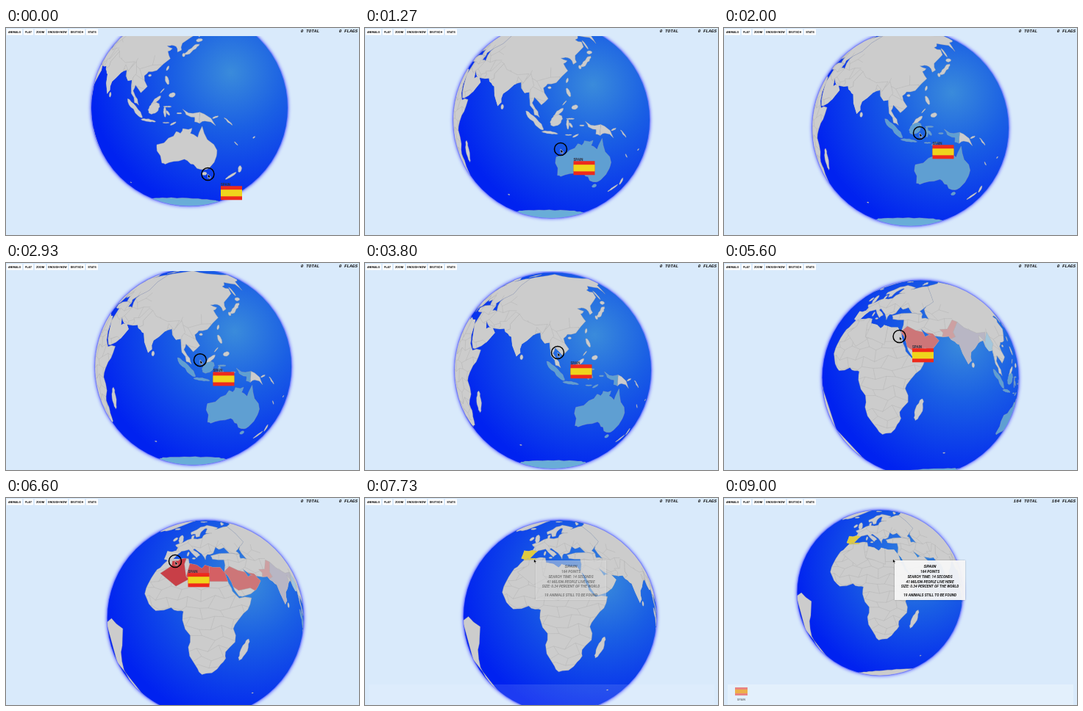
Write an HTML page with a canvas that moves like this. It is 480 by 282 pixels and loops after 9070 ms.

```html
<!DOCTYPE html>
<html lang="en">
<head>
<meta charset="utf-8">
<title>Flag globe</title>
<style>
  html, body { margin: 0; width: 100%; height: 100%; overflow: hidden; background: #d9eafb; }
  canvas { display: block; width: 100vw; height: 100vh; }
</style>
</head>
<body>
<canvas id="stage"></canvas>
<script>
const LOOP = 9070, FOUND = 7550;
const canvas = document.getElementById('stage');
const ctx = canvas.getContext('2d');

const clamp = v => Math.max(0, Math.min(1, v));
const progress = (t, from, length) => clamp((t - from) / length);
const mix = (a, b, k) => a + (b - a) * k;
const noise = (a, b) => Math.sin(a * 12.9 + b * 78.2) * 43758.5 % 1;
const rad = Math.PI / 180;

// Key points as longitude, latitude; roughen() adds the small coastal detail.
const africa = [
  -6,36, 3,37, 10,37.3, 11,34, 20,30.5, 22,32.8, 32.5,31.2, 37,21, 39,16, 43,11.8, 51,12, 48,5, 42,-1, 39,-6,
  40.5,-14, 35,-20, 35.5,-24, 32.5,-28, 27,-33.7, 20,-34.8, 18,-33, 15,-27, 12,-17, 13.5,-10, 9,-1, 9.5,4, 6,4.4,
  2,6.3, -8,4.5, -13,8.5, -17,14.5, -16,20, -13,27.5, -9.8,31];
const europe = [
  -5.5,36, -9,37, -9.3,43, -1.8,43.4, -1.2,46, -4.6,48.3, 1.6,50.5, 8.5,54, 8.2,57, 10.6,57.6, 10.5,54, 19,54.5,
  23.5,59.3, 30,60, 22.5,60, 25,65.5, 22,65.8, 17.3,61.5, 16.3,56.3, 13,55.5, 11,59, 7,58, 5,61, 15,68, 25,71,
  41,67, 35,64.5, 44,66.5, 60,69, 60,51, 53,47, 47.5,43, 49.5,40.5, 41.5,41.5, 38,46, 33.5,44.5, 31,46.5,
  28.5,41.5, 23.8,40.5, 22.5,36.5, 19.5,41, 13.7,45, 12.5,44, 18.4,40, 16,38, 9,44.3, 3.2,43, 0,39.5, -2,36.8];
const asia = [
  60,51, 60,69, 73,72, 104,77.5, 130,71, 180,69, 178,62.5, 163,60, 156.7,51, 156,57, 142,59, 135.5,54.7, 141,52.5,
  140,48, 129.5,41, 129.3,36, 126.5,34.5, 125,38.5, 121.5,39.5, 118,39, 122.5,37, 119.5,35, 122,30, 114,22.3,
  108.5,21.5, 106,19, 109,12.5, 105,8.8, 100.7,13.4, 99.5,10, 103,5, 104,1.5, 101,3, 98.3,8.5, 97.5,16.5, 94.5,16,
  91.5,22.5, 87,21, 80.3,15.5, 79.8,10.3, 77.5,8.2, 72.8,20, 70,22, 66.5,25.2, 57,25.5, 51,28, 48.5,30, 51,25,
  56.3,26, 59.8,22.5, 55,17, 45,12.8, 43,13, 39,21.5, 35,28, 36,36.5, 27.5,37, 26.3,39.5, 41.5,41.5, 49.5,40.5,
  49,37.5, 54,37, 51,44.5, 53,47];
const australia = [
  114,-22, 122,-18, 127,-14, 129.5,-15, 131,-12.2, 136.5,-12, 135.5,-15, 140,-17.5, 142.5,-10.8, 146,-18.8,
  153,-25.5, 153.3,-29.5, 150,-37.4, 146.5,-39, 140.5,-38, 138,-35.2, 135.8,-34.8, 131.5,-31.5, 124,-33,
  117.5,-35, 115.2,-34.2, 113.5,-26];
const southAmerica = [-50,0, -35,-6, -39,-16, -48,-26, -58,-38.5, -68,-52, -75,-50, -80,-4];
const papuaWest = [131,-.8, 134.5,-3, 141,-2.6, 141,-9.1, 138,-8.2, 138,-5.5, 133,-4];
const papuaEast = [141,-2.6, 147.8,-6.2, 150.7,-10.5, 144,-7.7, 141,-9.1];

// Islands are tilted ellipses: longitude, latitude, half length, half width, tilt.
const islands = [
  [46.9,-18.7,7,2,72], [80.7,7.7,1.5,.9,90], [121,23.7,1.6,.6,70], [109.8,19.2,1,.7,0], [137,36.5,6,1.2,42],
  [131,32.5,1.3,.8,90], [143,43.4,2,1.2,20], [143,50,4,.6,93], [121.3,16.3,2.8,1,110], [124.8,7.5,2,1.3,20],
  [118.7,10,1.8,.3,48], [115,4.2,4,1,42], [150.3,-5.5,1.9,.5,20], [158.5,-8,3.5,.4,-38], [165.5,-21.3,1.8,.3,-38],
  [178.3,-17.5,.9,.5,30], [69.5,-49.3,.7,.4,0], [175.8,-38.5,2.8,1.2,-62], [170.5,-43.8,3.8,1.1,48],
  [-2,53.5,4.2,1.5,105], [-8,53.3,1.9,1.2,80], [-19,65,1.9,1.1,0], [14,37.5,1,.6,0], [9.1,40.8,1.7,.6,88],
  [18,78.5,2,1.2,0], [60,74,4,.8,55], [-40,72,11,6,75]
].map(island);
const indonesianIslands = [
  [101,-.3,7.6,1.5,-47], [110,-7.4,4.8,.7,-8], [113.8,-.3,4.2,2.8,40], [120.5,-2.5,3,.7,92], [122,.7,2.4,.4,0],
  [122.3,-3,1.7,.7,-55], [121,-8.7,2,.3,0], [125.3,-9.2,2,.5,28], [129,-3.2,1.5,.4,0]
].map(island);

function island([lon, lat, a, b, tilt]) {
  const points = [], c = Math.cos(tilt * rad), s = Math.sin(tilt * rad);
  for (let i = 0; i < 10; i++) {
    const u = a * Math.cos(i * 36 * rad), v = b * Math.sin(i * 36 * rad);
    points.push(lon + (u * c - v * s) / Math.cos(lat * rad), lat + u * s + v * c);
  }
  return points;
}

function roughen(outline) {
  const result = [], n = outline.length;
  for (let i = 0; i < n; i += 2) {
    const [x, y] = [outline[i], outline[i + 1]], [u, v] = [outline[(i + 2) % n], outline[(i + 3) % n]];
    const mx = (x + u) / 2, my = (y + v) / 2, size = .13 * Math.min(8, Math.hypot(u - x, v - y));
    result.push(x, y, mx + size * noise(mx, my), my + size * noise(my, mx));
  }
  return result;
}

const antarctica = [];
for (let lon = -180; lon < 180; lon += 8) {
  antarctica.push(lon, -66.3 - 9 * Math.sin((lon - 100) / 2 * rad) ** 2 + .5 * noise(lon, 1));
}

const mainland = [africa, europe, asia].map(roughen);
const outerLand = [...islands, southAmerica, papuaEast].map(roughen);

// Neighbouring states form a jittered brick pattern.
const borders = [];
function borderNode(i, j) {
  return [i * 6.5 + 2.6 * noise(i, j), j * 6 + 2.4 * noise(j, i + 5)];
}
for (let i = -3; i < 19; i++) {
  for (let j = -5; j < 9; j++) {
    if ((i > 10 && j > 4) || (i > 5 && j > 7)) continue;
    borders.push([...borderNode(i, j), ...borderNode(i + 1, j)]);
    if ((i + j) % 2) borders.push([...borderNode(i, j), ...borderNode(i, j + 1)]);
  }
}

// Coast sides may overshoot, since these are clipped to the mainland.
const states = {
  myanmar: [92,21, 94,14, 98,9, 98,18, 100,20.5, 97.5,28],
  india: [67,23.7, 71,25, 70,28, 75,35, 79,31, 88,27.4, 96,28, 93,22, 89,26, 88,20, 82,5, 70,8],
  pakistan: [61.7,24, 63,27.5, 61,29.8, 66.3,30, 71.5,36.5, 75,35, 70,28, 71,25, 67,23.5],
  arabia: [34.5,28, 39,32, 44.7,29.2, 50,28, 56,27, 61,22, 55,16, 51,18, 43,16.5, 38,20],
  egypt: [25,33, 34.3,32, 34.9,29.5, 37,22, 25,22],
  libya: [11.5,34, 25,34, 25,20, 16,23.4, 10,25],
  algeria: [-2,36, 8.5,38, 7.7,33.5, 10,25, 12,23.5, 4,19, -8.6,27.3, -1.5,32.2],
  spain: [-10,35.5, -10,45, -1.8,43.4, 3.5,42.4, 3,36]
};

// Moment the pointer reaches each country, and the colour it takes.
const hovers = {
  antarctica: [0, '#69add8'], australia: [150, '#5f9fd2'], indonesia: [1700, '#5f9fd2'], myanmar: [4050, '#a3c6dc'],
  india: [4450, '#b8b6c4'], pakistan: [4900, '#cda0a2'], arabia: [5200, '#cd7678'], egypt: [5650, '#d46064'],
  libya: [5950, '#cf5054'], algeria: [6250, '#c83f47']
};
const separateLand = {
  antarctica: [antarctica],
  australia: [australia, island([146.7, -42, 1.5, 1.3, 0])].map(roughen),
  indonesia: [...indonesianIslands, papuaWest].map(roughen)
};

// time, pointer x, pointer y, longitude facing the viewer
const path = [
  [0, 274.5, 199, 135], [1270, 266, 165, 111], [2000, 266, 143, 111], [3800, 262, 122, 99.5],
  [4700, 253, 113, 80], [5600, 238.5, 100, 48], [6600, 230, 86, 22.5], [7300, 229.5, 83, 21], [LOOP, 229.5, 83, 21]
];

function pointerAt(t) {
  const i = path.findIndex((key, n) => n && t <= key[0]);
  const a = path[i - 1], b = path[i], k = (t - a[0]) / (b[0] - a[0]);
  return { x: mix(a[1], b[1], k), y: mix(a[2], b[2], k), lon: mix(a[3], b[3], k) };
}

// The globe slides against the pointer, then settles and shrinks once the country is found.
function globeAt(t, pointer) {
  const p = progress(t, FOUND, 900), k = p * p * (3 - 2 * p);
  return {
    x: mix(383.7 - .489 * pointer.x, 212, k), y: mix(206 - .489 * pointer.y, 129, k),
    r: mix(134, 113, k), lon: pointer.lon
  };
}

// Points behind the horizon are pushed out to the rim.
function project(globe, lon, lat) {
  const d = (lon - globe.lon) * rad, c = Math.cos(lat * rad);
  let x = c * Math.sin(d), y = -Math.sin(lat * rad);
  const visible = c * Math.cos(d) >= 0;
  if (!visible) { const n = Math.hypot(x, y) || 1; x /= n; y /= n; }
  return { x: globe.x + globe.r * x, y: globe.y + globe.r * y, visible };
}

function shape(globe, outline) {
  const points = [], result = new Path2D();
  for (let i = 0; i < outline.length; i += 2) points.push(project(globe, outline[i], outline[i + 1]));
  if (points.some(p => p.visible)) {
    points.forEach(p => result.lineTo(p.x, p.y));
    result.closePath();
  }
  return result;
}

function land(globe, outlines, color) {
  ctx.fillStyle = color;
  for (const outline of outlines) {
    const area = shape(globe, outline);
    ctx.fill(area);
    ctx.stroke(area);
  }
}

function disc(globe) {
  ctx.beginPath();
  ctx.arc(globe.x, globe.y, globe.r, 0, 7);
}

function countryColor(name, t) {
  if (t >= FOUND) return name === 'spain' ? '#dfca40' : '#ccc';
  const [start, color] = hovers[name] || [LOOP];
  return t >= start ? color : '#ccc';
}

function drawLand(globe, t) {
  ctx.lineWidth = .35;
  ctx.lineJoin = 'round';
  ctx.strokeStyle = '#a9a9a9';
  land(globe, outerLand, '#ccc');
  land(globe, mainland, '#ccc');
  for (const name in separateLand) land(globe, separateLand[name], countryColor(name, t));

  ctx.save();
  const area = new Path2D();
  for (const outline of mainland) area.addPath(shape(globe, outline));
  ctx.clip(area);
  ctx.beginPath();
  for (const [lon, lat, lon2, lat2] of borders) {
    const a = project(globe, lon, lat), b = project(globe, lon2, lat2);
    if (a.visible && b.visible) { ctx.moveTo(a.x, a.y); ctx.lineTo(b.x, b.y); }
  }
  ctx.stroke();
  for (const name in states) land(globe, [states[name]], countryColor(name, t));
  ctx.restore();
}

function drawGlobe(globe, t) {
  const { x, y, r } = globe;
  ctx.save();
  ctx.beginPath();
  ctx.rect(0, 11, 480, 271);
  ctx.clip();

  const lightX = x + .42 * r, lightY = y - .36 * r;
  const ocean = ctx.createRadialGradient(lightX, lightY, 0, lightX, lightY, 1.45 * r);
  ocean.addColorStop(0, '#3a8bdb');
  ocean.addColorStop(.4, '#1a5fe4');
  ocean.addColorStop(1, '#0022f0');
  ctx.save();
  ctx.shadowColor = '#3a3aff';
  ctx.shadowBlur = 5 * canvas.width / 480;
  ctx.fillStyle = ocean;
  disc(globe);
  ctx.fill();
  ctx.restore();

  ctx.save();
  disc(globe);
  ctx.clip();
  drawLand(globe, t);
  ctx.restore();

  disc(globe);
  ctx.lineWidth = 1.2;
  ctx.strokeStyle = 'rgba(125,135,255,.7)';
  ctx.stroke();
  ctx.restore();
}

function box(x, y, w, h, color) {
  ctx.fillStyle = color;
  ctx.fillRect(x, y, w, h);
}

function label(text, x, y, font, align = 'left', color = '#111') {
  ctx.font = font;
  ctx.textAlign = align;
  ctx.fillStyle = color;
  ctx.fillText(text, x, y);
}

const sans = (size, style = 'bold') => `${style} ${size}px Roboto, sans-serif`;
const mono = 'italic bold 6px "Liberation Mono", monospace';

function flag(x, y, w, h) {
  box(x, y, w, h, '#ee2a1c');
  box(x, y + h * .26, w, h * .48, '#efd51c');
}

function drawHeader(t) {
  const buttons = [['ANIMALS', 1, 21], ['FLAT', 24, 13], ['ZOOM', 39, 15], ['ENOUGH NOW', 56, 28],
    ['DEUTSCH', 86, 21], ['STATS', 109, 16]];
  for (const [text, x, w] of buttons) {
    box(x, 1.5, w, 8, '#fff');
    label(text, x + w / 2, 7, sans(3.9), 'center');
  }
  const score = Math.round(164 * progress(t, 7800, 1150));
  label(score + ' TOTAL', 426, 6.3, mono, 'right');
  label(score + ' FLAGS', 478, 6.3, mono, 'right');
}

function drawArrow(x, y) {
  ctx.beginPath();
  for (const [dx, dy] of [[0, 0], [0, 5.6], [1.3, 4.5], [2.2, 6.6], [3.1, 6.2], [2.2, 4.2], [4, 4.1]]) {
    ctx.lineTo(x + dx, y + dy);
  }
  ctx.closePath();
  ctx.lineWidth = .5;
  ctx.strokeStyle = '#fff';
  ctx.fillStyle = '#000';
  ctx.fill();
  ctx.stroke();
}

function drawHeldFlag(pointer) {
  const x = pointer.x + 17.5, y = pointer.y + 16.3;
  label('SPAIN', x, y - .6, sans(4.6), 'left', '#303040');
  flag(x, y, 29, 19);
  ctx.beginPath();
  ctx.arc(pointer.x, pointer.y, 8.5, 0, 7);
  ctx.lineWidth = 1.5;
  ctx.strokeStyle = '#000';
  ctx.stroke();
}

function drawResult(t) {
  ctx.globalAlpha = progress(t, FOUND, 400);
  box(5, 254, 470, 28, 'rgba(255,255,255,.25)');
  ctx.save();
  ctx.shadowColor = 'rgba(0,0,0,.3)';
  ctx.shadowBlur = 2;
  box(232, 85, 96, 54, 'rgba(250,250,250,.94)');
  ctx.restore();
  label('SPAIN', 280, 95, sans(6.2, 'italic bold'), 'center');
  const lines = [['164 POINTS', 102.4], ['SEARCH TIME: 14 SECONDS', 108.5], ['41 MILION PEOPLE LIVE HERE', 116],
    ['SIZE: 0.34 PERCENT OF THE WORLD', 122], ['19 ANIMALS STILL TO BE FOUND', 134]];
  for (const [text, y] of lines) label(text, 280, y, sans(4.9, 'italic bold'), 'center');

  ctx.globalAlpha = .55 * progress(t, 8150, 800);
  flag(15, 258, 17, 11);
  label('SPAIN', 23.5, 276, sans(4), 'center', '#222');
  ctx.globalAlpha = 1;
}

function resize() {
  canvas.width = innerWidth * devicePixelRatio;
  canvas.height = innerHeight * devicePixelRatio;
}

function draw() {
  const t = performance.now() % LOOP;
  const pointer = pointerAt(t);
  ctx.setTransform(canvas.width / 480, 0, 0, canvas.height / 282, 0, 0);
  box(0, 0, 480, 282, '#d9eafb');
  drawGlobe(globeAt(t, pointer), t);
  drawHeader(t);
  if (t < FOUND) drawHeldFlag(pointer);
  else drawResult(t);
  drawArrow(pointer.x, pointer.y);
  requestAnimationFrame(draw);
}

addEventListener('resize', resize);
resize();
draw();
</script>
</body>
</html>
```
